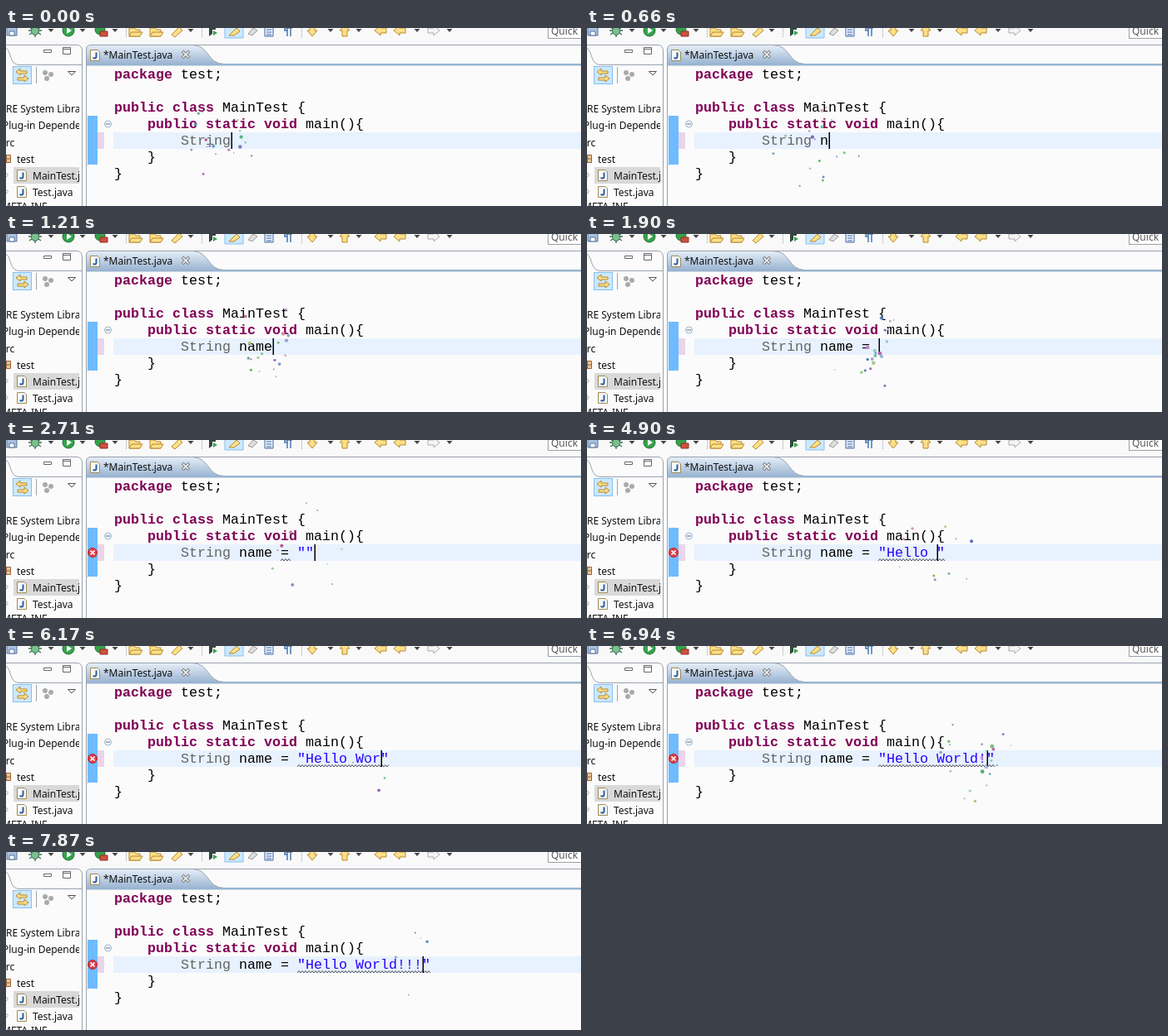
Write an HTML page with a canvas that moves like this. It is 691 px wide and 215 px high and loops after 7990 ms.

```html
<!DOCTYPE html>
<html lang="en">
<head>
<meta charset="utf-8">
<title>Typing with sparks</title>
<style>
  html, body { margin: 0; width: 691px; height: 215px; overflow: hidden; background: #fbfbfb; }
  svg, canvas { position: absolute; left: 0; top: 0; display: block; }
  .ui { font: 12px "Noto Sans", "Open Sans", sans-serif; fill: #111; }
  .code { font: 16.667px "Liberation Mono", "Courier New", monospace; fill: #000; }
  .code text, .code tspan { white-space: pre; }
  .kw { font-weight: bold; fill: #7f0055; }
  .str { fill: #2a00ff; }
  .type { fill: #646464; }
  .gold { fill: #fbe08a; stroke: #b9882a; }
  .line { fill: none; stroke: #9aa3ae; }
</style>
</head>
<body>
<svg width="691" height="215" viewBox="0 0 691 215">
  <defs>
    <linearGradient id="tabFill" x2="0" y2="1">
      <stop offset="0" stop-color="#e6eef8"/><stop offset="1" stop-color="#99b4d1"/>
    </linearGradient>
    <pattern id="checker" width="2" height="2" patternUnits="userSpaceOnUse">
      <path d="M0 0H2V2H0Z" fill="#d3eaff"/><path d="M0 0H1V1H0ZM1 1H2V2H1Z" fill="#0a8cff"/>
    </pattern>
    <clipPath id="tree"><rect y="70" width="88" height="145"/></clipPath>
    <symbol id="file" overflow="visible">
      <path d="M-5.5-6.500H3L5.500-4V6.500H-5.500Z" fill="#f5f9ff" stroke="#a08a50"/>
      <path d="M1.500-3.500V1.500Q1.500 3.700-1 3.500L-2.500 3" fill="none" stroke="#2c5f9e" stroke-width="2"/>
    </symbol>
    <symbol id="folder" overflow="visible">
      <path class="gold" d="M-7-3H-1L1-1H6V7H-7Z"/><path class="gold" d="M-7 7L-4 2H9L6 7Z"/>
    </symbol>
    <symbol id="drop" overflow="visible"><path d="M-3.500-2H3.500L0 2Z" fill="#444"/></symbol>
    <symbol id="arrow" overflow="visible"><path d="M-7 0L0-6V-3H7V3H0V6Z"/></symbol>
  </defs>

  <rect width="691" height="20" fill="#f9f9f9"/>
  <g id="tools">
    <path d="M1-3H13V9H1Z" fill="#a9c1e0" stroke="#56749d"/>
    <path d="M4 4H10V9H4Z" fill="#fff" stroke="#56749d"/>
    <path d="M28-1L42 8M42-1L28 8M27 3H43M35-3V11" stroke="#3e6b52" stroke-width="1.300"/>
    <ellipse cx="35" cy="3.500" rx="4.500" ry="5" fill="#7cbf8b" stroke="#326f5a"/>
    <circle cx="75" cy="3" r="7" fill="#35a24a" stroke="#1d7333"/>
    <path d="M73-1L79 3L73 7Z" fill="#fff"/>
    <circle cx="113" cy="2" r="6" fill="#35a24a" stroke="#1d7333"/>
    <path d="M113 4H122V10H113Z" fill="#d0503f" stroke="#8e2d22"/>
    <use href="#folder" x="155" y="3"/><use href="#folder" x="180" y="3"/>
    <path class="gold" d="M199 8L208-1L212 3L203 11Z"/>
    <path d="M244-2V10L248 7V2H252V-2Z" fill="#31483f"/><path d="M249 3L254 6L249 9Z" fill="#35a24a"/>
    <path d="M263-1H285V12H263Z" fill="#cce8ff" stroke="#85bff0"/>
    <path class="gold" d="M268 9L277 0L281 4L274 9Z"/>
    <path d="M291 7L297 0L302 3L296 9Z" fill="#ddd" stroke="#999"/>
    <path d="M311-1H321V10H311Z" fill="#e8f0fb" stroke="#3f67a5"/>
    <path d="M313 2H319M313 5H319M313 8H319" stroke="#3f67a5"/>
    <path d="M338-1V10M342-1V10M338 3H335V0H344" fill="none" stroke="#4777b2" stroke-width="1.500"/>
    <path class="line" d="M144.500 0V12M235.500 0V12M355.500 0V12" stroke-dasharray="1 1"/>
  </g>
  <rect x="651.500" y="-5" width="45" height="17.500" fill="#fff" stroke="#9a9fa7"/>
  <text class="ui" x="655" y="8" style="fill:#555">Quick</text>

  <path class="line" d="M0 20.500H85Q91.500 20.500 91.500 28V215"/>
  <path class="line" d="M0 24C7 29 4 44.500 16 44.500H91"/>
  <path d="M45.500 26.500H54.500V29.500H45.500ZM68.500 23.500H77.500V31.500H68.500ZM68.500 25.500H77.500" fill="#fff" stroke="#666"/>
  <rect x="8.500" y="46.500" width="22" height="21" fill="#cce8ff" stroke="#85bff0"/>
  <path class="gold" d="M12 53L17 49V52H25V55H17V57ZM27 61L22 57V60H14V63H22V65Z"/>
  <path class="line" d="M36.500 47V67"/>
  <g fill="#aaa"><circle cx="47" cy="54" r="3"/><circle cx="54" cy="56" r="3"/><circle cx="49" cy="61" r="3"/></g>
  <path d="M74.500 52.500H83.500L79 57Z" fill="#fff" stroke="#555"/>
  <g class="ui" clip-path="url(#tree)">
    <rect x="9" y="168" width="80" height="20" fill="#d9d9d9"/>
    <text x="0" y="102">RE System Library</text>
    <text x="-4" y="122">Plug-in Dependencies</text>
    <text x="-6" y="143">src</text>
    <path d="M-4 153.500H5.500V162.500H-4M.500 153V163M-4 158H5" fill="#e8c69a" stroke="#98633b"/>
    <text x="13" y="163">test</text>
    <path class="line" d="M-1 174L2.500 177.500L-1 181M-1 194L2.500 197.500L-1 201"/>
    <use href="#file" x="19" y="178"/><text x="32" y="183">MainTest.java</text>
    <use href="#file" x="19" y="198"/><text x="32" y="203">Test.java</text>
    <text x="-5" y="220">META-INF</text>
  </g>

  <path d="M96.500 44V25Q97 20.500 102 20.500H224C244 20.500 242 43.500 262 43.500Z" fill="url(#tabFill)"/>
  <path class="line" d="M96.500 215V25Q97 20.500 102 20.500H691M224 20.500C244 20.500 242 43.500 262 43.500H691"/>
  <rect x="97" y="43" width="594" height="2.500" fill="#99b4d1"/>
  <use href="#file" x="107" y="33"/>
  <text class="ui" x="117" y="37">*MainTest.java</text>
  <path d="M212 28L220 36M220 28L212 36" stroke="#777" stroke-width="3.500"/>
  <path d="M212.500 28.500L219.500 35.500M219.500 28.500L212.500 35.500" stroke="#fff" stroke-width="1.500"/>

  <rect x="98" y="106" width="12" height="59" fill="url(#checker)"/>
  <rect x="110" y="126" width="8" height="20" fill="#ead5ea"/>
  <rect x="129" y="126" width="562" height="20" fill="#e8f2fe"/>
  <circle cx="122.500" cy="116" r="4" fill="#f4f8fc" stroke="#9bb2c8"/>
  <path d="M120 116H125" stroke="#56718d"/>
  <g id="error">
    <circle cx="104" cy="136" r="5.500" fill="#dc3f49" stroke="#b92732"/>
    <path d="M101.500 133.500L106.500 138.500M106.500 133.500L101.500 138.500" stroke="#fff" stroke-width="1.700"/>
  </g>

  <g class="code">
    <text x="130" y="61"><tspan class="kw">package</tspan> test;</text>
    <text x="130" y="101"><tspan class="kw">public class</tspan> MainTest {</text>
    <text x="170" y="121"><tspan class="kw">public static void</tspan> main(){</text>
    <text x="210" y="141"><tspan class="type">String</tspan><tspan id="plain"></tspan><tspan id="literal" class="str"></tspan></text>
    <text x="170" y="161">}</text>
    <text x="130" y="181">}</text>
  </g>
  <path id="wave" fill="none" stroke="#50505c"/>
  <rect id="caret" y="126" width="1.500" height="20"/>
</svg>
<canvas width="691" height="215"></canvas>
<script>
const LOOP = 7990, STEP = LOOP / 60;
const TEXT_X = 210, LINE_Y = 135, CHAR = 10;
const ERROR_AT = 2440, CARET_BACK = 2870;
const $ = id => document.getElementById(id);
const ctx = document.querySelector('canvas').getContext('2d');

const icon = (name, x, turn = 0) => `<use href="#${name}" transform="translate(${x} 3) rotate(${turn})"/>`;
$('tools').insertAdjacentHTML('beforeend',
  [54, 92, 131, 222, 390, 424, 494, 533].map(x => icon('drop', x)).join('') +
  `<g class="gold">${icon('arrow', 368, -90)}${icon('arrow', 407, 90)}${icon('arrow', 450)}${icon('arrow', 473)}</g>` +
  `<g fill="#f4f4f4" stroke="#aaa">${icon('arrow', 514, 180)}</g>`);

// Each run of typing: text, first key, time between keys
const keys = [
  ['String', -1300, 220], [' name', 130, 230], [' = ', 1340, 210], ['""', 1940, 200],
  ['Hello ', 3395, 220], ['Wor', 5080, 330], ['ld!!!', 6300, 270]
].flatMap(([text, start, gap]) => [...text].map((char, i) => ({ char, time: start + i * gap })));
const typed = keys.map(k => k.char).join('');
const OPEN = typed.indexOf('"'), BODY = OPEN + 2;

// The closing quote appears with the opening one; the caret later steps back inside.
function caretX(n, t) {
  const inside = n > BODY || (n === BODY && t >= CARET_BACK);
  return TEXT_X + 1 + CHAR * (inside ? n - 1 : n);
}

function seeded(seed) {
  return () => (seed = (seed * 16807) % 2147483647) / 2147483647;
}
const rnd = seeded(4271);
const between = (a, b) => a + (b - a) * rnd();

const sparks = keys.flatMap(({ time }, i) => Array.from({ length: 9 }, () => ({
  born: time,
  life: between(250, 800),
  x: caretX(i + 1, time),
  angle: between(0, 2 * Math.PI),
  reach: between(25, 65),
  r: between(1, 2.7),
  color: `hsl(${between(80, 340)} 38% ${between(50, 75)}%)`
})));

function drawSpark(s, t) {
  const u = (t - s.born) / s.life;
  if (u < 0 || u >= 1) return;
  const d = s.reach * (1 - (1 - u) ** 2);
  ctx.fillStyle = s.color;
  ctx.beginPath();
  ctx.arc(s.x + 0.8 * d * Math.cos(s.angle), LINE_Y + d * Math.sin(s.angle), s.r * (1 - u / 3), 0, 2 * Math.PI);
  ctx.fill();
}

function wavePath(from, to) {
  let d = `M${from} 146`;
  for (let x = from + 2, up = true; x <= to; x += 2, up = !up) d += `L${x} ${up ? 143.5 : 146}`;
  return d;
}

function draw(t) {
  const n = keys.filter(k => k.time <= t).length;
  const literal = n > OPEN ? `"${typed.slice(BODY, Math.max(BODY, n))}"` : '';
  $('plain').textContent = typed.slice('String'.length, Math.min(n, OPEN));
  $('literal').textContent = literal;
  $('caret').setAttribute('x', caretX(n, t) - 0.5);

  const bad = t >= ERROR_AT;
  const start = TEXT_X + CHAR * (n > BODY ? OPEN : typed.indexOf('='));
  const width = n > BODY ? CHAR * literal.length : CHAR + 2;
  $('error').style.display = bad ? '' : 'none';
  $('wave').setAttribute('d', bad ? wavePath(start, start + width) : '');

  ctx.clearRect(0, 0, 691, 215);
  sparks.forEach(s => drawSpark(s, t));
}

function frame() {
  const now = performance.now() % LOOP;
  draw(Math.floor(now / STEP) * STEP);
  requestAnimationFrame(frame);
}
frame();
</script>
</body>
</html>
```
